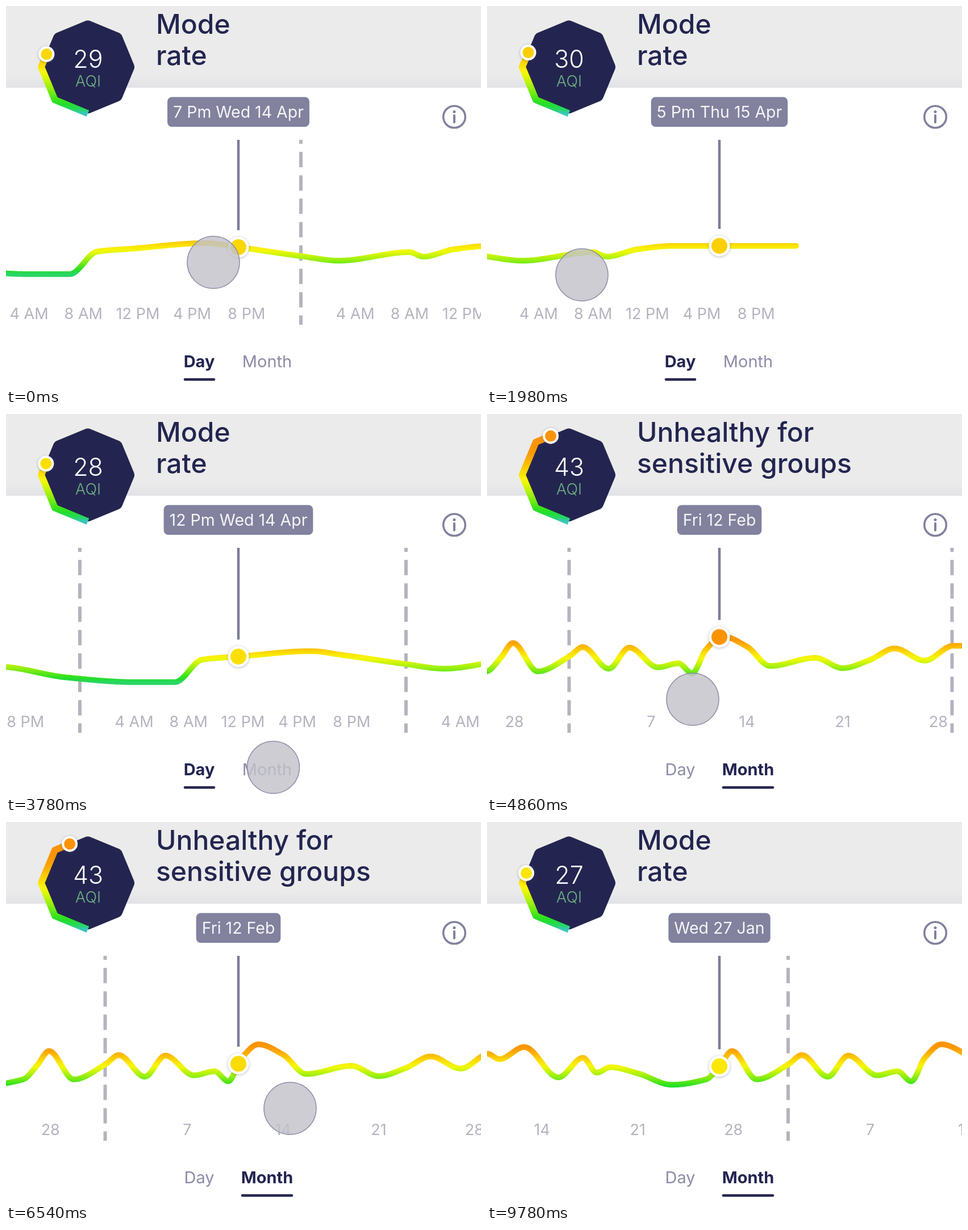
Write an HTML page with a canvas that moves like this. It is 836 by 670 pixels and loops after 9.84 s.

```html
<!DOCTYPE html>
<html lang="en">
<head>
<meta charset="utf-8">
<title>Air quality timeline</title>
<style>
html, body { margin: 0; width: 100%; height: 100%; overflow: hidden; background: #fff; }
canvas { display: block; }
</style>
</head>
<body>
<canvas id="stage" width="836" height="670"></canvas>
<script>
const ctx = document.getElementById('stage').getContext('2d');
const LOOP = 9840, STEP = 60, SWITCH = 4080;
const CURSOR_X = 409, HOUR = 23.92, DAY = 24.07;
const NAVY = '#232550', SLATE = '#82819e', PALE = '#b4b3bf';

// Monotone cubic through [x, y] points, flat at both ends.
function spline(points) {
  const last = points.length - 1;
  const slope = points.slice(1).map((p, i) => (p[1] - points[i][1]) / (p[0] - points[i][0]));
  const tangent = points.map((_, i) => {
    const a = slope[i - 1], b = slope[i];
    return i > 0 && i < last && a * b > 0 ? 2 * a * b / (a + b) : 0;
  });
  return x => {
    if (x <= points[0][0]) return points[0][1];
    if (x >= points[last][0]) return points[last][1];
    const i = points.findIndex(p => p[0] > x) - 1;
    const [x0, y0] = points[i], [x1, y1] = points[i + 1];
    const w = x1 - x0, u = (x - x0) / w, v = 1 - u;
    return v * v * (1 + 2 * u) * y0 + u * u * (3 - 2 * u) * y1
      + w * u * v * (v * tangent[i] - u * tangent[i + 1]);
  };
}

// Key readings: hours from the latest midnight, days from the first of February.
const dayAqi = spline([[-30, 20.5], [-25, 12.5], [-20, 9], [-17, 9], [-15, 25.7], [-12.3, 28], [-7, 32],
  [-4.6, 29], [0, 22.4], [2.8, 19], [8, 25.3], [9, 22], [11.3, 27.5], [14, 30]]);
const monthAqi = spline([[-22, 36], [-21.1, 32], [-19.3, 41], [-16.8, 18.5], [-15, 33], [-14, 22], [-13, 26],
  [-11, 21.5], [-8.5, 13], [-6, 17], [-5, 27], [-4.1, 38], [-2.3, 17], [0, 28], [1, 35], [2.9, 19], [4.4, 34.6],
  [6.5, 20], [8, 23], [9, 15.6], [10, 33], [11.2, 43], [13, 35.4], [14.7, 21], [18, 27], [20, 19.4],
  [22, 25.5], [23.8, 34], [26, 25], [28.1, 36]]);

const dayScroll = spline([[0, 519], [1980, -4.7], [3000, 704]]);
const monthScroll = spline([[6480, 144.5], [6540, 174.5], [6900, 380], [7700, 530]]);
const touch = [[0, 365, 452], [1980, 167, 474], [3000, 695, 509], [3900, 459, 628], [4150, 459, 628],
  [4860, 362, 503], [6300, 460, 505], [6540, 500, 505], [7100, 760, 505]];
const touchX = spline(touch.map(([t, x]) => [t, x]));
const touchY = spline(touch.map(([t, , y]) => [t, y]));

const ringPosition = spline([[5, 1.2], [27, 2.3], [30, 2.44], [43, 3.45]]);
const hue = spline([[7, 178], [9, 141], [25, 65], [30, 54], [43, 35]]);
const aqiColor = aqi => `hsl(${hue(aqi)}, ${Math.min(97, 115 - hue(aqi) / 3)}%, 50%)`;
const dotColor = aqi => aqiColor(aqi + 2.5);
const aqiY = aqi => 430 - (aqi - 27) * 2.375;

// Vertical paint whose colour follows the reading from `low` (at yLow) up to 43 (at yHigh).
function aqiPaint(low, yLow, yHigh) {
  const paint = ctx.createLinearGradient(0, yLow, 0, yHigh);
  for (let u = 0; u <= 1; u += 1 / 16) paint.addColorStop(u, aqiColor(low + (43 - low) * u));
  return paint;
}
const curvePaint = aqiPaint(9, aqiY(9), aqiY(43));
const ringPaint = aqiPaint(7, 190, 58);
const headerPaint = ctx.createLinearGradient(0, 122, 0, 144);
headerPaint.addColorStop(0, '#ebebeb');
headerPaint.addColorStop(1, '#e2e2e6');

function text(str, x, y, size, weight, color, align = 'center') {
  ctx.font = `${weight} ${size}px Inter, sans-serif`;
  ctx.textAlign = align;
  ctx.fillStyle = color;
  ctx.fillText(str, x, y);
}

function disc(x, y, r, color) {
  ctx.fillStyle = color;
  ctx.beginPath();
  ctx.arc(x, y, r, 0, 7);
  ctx.fill();
}

function stroke(points, width, color, cap = 'butt') {
  ctx.strokeStyle = color;
  ctx.lineWidth = width;
  ctx.lineCap = cap;
  ctx.lineJoin = 'round';
  ctx.beginPath();
  points.forEach(p => ctx.lineTo(...p));
  ctx.stroke();
}

function knob(x, y, r, rim, color) {
  ctx.save();
  ctx.shadowColor = 'rgba(60,60,90,.35)';
  ctx.shadowBlur = 5;
  ctx.shadowOffsetY = 1;
  disc(x, y, r + rim, '#fff');
  ctx.restore();
  disc(x, y, r, color);
}

function divider(x) {
  ctx.setLineDash([27, 14.2]);
  ctx.lineDashOffset = 20;
  stroke([[x, 236], [x, 562]], 6, PALE);
  ctx.setLineDash([]);
}

// Octagon corner, clockwise from the bottom.
function corner(k, r) {
  const a = Math.PI / 2 + k * Math.PI / 4;
  return [144 + r * Math.cos(a), 107.5 + r * Math.sin(a)];
}

function ringPoint(s) {
  const k = Math.floor(s), [x0, y0] = corner(k, 82), [x1, y1] = corner(k + 1, 82);
  return [x0 + (x1 - x0) * (s - k), y0 + (y1 - y0) * (s - k)];
}

function drawHeader(aqi) {
  ctx.fillStyle = headerPaint;
  ctx.fillRect(0, 0, 836, 144);
  const title = aqi < 20 ? ['Good'] : aqi < 40 ? ['Mode', 'rate'] : ['Unhealthy for', 'sensitive groups'];
  title.forEach((line, i) => text(line, 264, 49 + 55 * i, 48, 500, NAVY, 'left'));

  const octagon = Array.from({ length: 9 }, (_, k) => corner(k, 70));
  stroke(octagon, 24, NAVY, 'round');
  ctx.fillStyle = NAVY;
  ctx.fill();

  const end = ringPosition(aqi), path = [];
  for (let k = 0; k < end; k++) path.push(ringPoint(k));
  path.push(ringPoint(end));
  stroke(path, 12, ringPaint);
  knob(...ringPoint(end), 10, 4, dotColor(aqi));
  text(aqi, 144.5, 109, 43, 300, '#fff');
  text('AQI', 144.5, 142, 27, 300, '#70b283');
}

function drawAxis(monthly, origin) {
  if (monthly) {
    for (let n = -31; n < 31; n++) {
      const date = new Date(Date.UTC(2021, 1, 1 + n)).getUTCDate(), x = origin + n * DAY;
      if (date === 1) divider(x);
      else if (date % 7 === 0) text(date, x, 552, 27, 400, PALE);
    }
  } else {
    for (let h = -32; h < 24; h += 4) {
      const clock = (h + 48) % 24, x = origin + h * HOUR;
      if (!clock) divider(x);
      else text(`${clock % 12 || 12} ${clock < 12 ? 'AM' : 'PM'}`, x, 552, 27, 400, PALE);
    }
  }
}

function drawBadge(label) {
  ctx.font = '400 28.5px Inter, sans-serif';
  const w = ctx.measureText(label).width + 20;
  ctx.fillStyle = SLATE;
  ctx.beginPath();
  ctx.roundRect(CURSOR_X - w / 2, 160.5, w, 52.5, 8);
  ctx.fill();
  text(label, CURSOR_X, 197, 28.5, 400, '#f5f5f9');
}

function drawInfo() {
  ctx.strokeStyle = SLATE;
  ctx.lineWidth = 3.6;
  ctx.beginPath();
  ctx.arc(789, 195.5, 19.3, 0, 7);
  ctx.stroke();
  disc(789, 186.5, 2.5, SLATE);
  stroke([[789, 193], [789, 205]], 4, SLATE, 'round');
}

function drawTabs(monthly) {
  const tab = (name, x, active) => text(name, x, 637, 29, active ? 700 : 400, active ? NAVY : '#8c8ba6');
  tab('Day', 340, !monthly);
  tab('Month', 459.5, monthly);
  const [from, to] = monthly ? [416, 503] : [315, 366];
  stroke([[from, 658.5], [to, 658.5]], 4.5, NAVY, 'round');
}

function labelFor(monthly, n) {
  const date = new Date(monthly ? Date.UTC(2021, 1, 1 + n) : Date.UTC(2021, 3, 15, n));
  const s = date.toUTCString(), h = date.getUTCHours();
  const day = `${s.slice(0, 3)} ${+s.slice(5, 7)} ${s.slice(8, 11)}`;
  return monthly ? day : `${h % 12 || 12} ${h < 12 ? 'Am' : 'Pm'} ${day}`;
}

function drawTouch(t) {
  ctx.globalAlpha = Math.min(1, Math.max(0, (7200 - t) / 200));
  disc(touchX(t), touchY(t), 46, 'rgba(195,194,202,.82)');
  ctx.strokeStyle = '#8d8ba8';
  ctx.lineWidth = 1.5;
  ctx.stroke();
  ctx.globalAlpha = 1;
}

function draw(t) {
  const monthly = t >= SWITCH;
  const [scroll, reading, unit] = monthly ? [monthScroll, monthAqi, DAY] : [dayScroll, dayAqi, HOUR];
  const origin = scroll(t), aqiAt = x => reading((x - origin) / unit);
  // Badge and gauge trail the curve by one step.
  const shown = (CURSOR_X - scroll(t - STEP)) / unit;

  ctx.fillStyle = '#fff';
  ctx.fillRect(0, 0, 836, 670);
  drawHeader(Math.round(reading(shown)));
  drawInfo();
  drawAxis(monthly, origin);

  const line = [], end = monthly ? 846 : Math.min(846, origin + 23 * HOUR);
  for (let x = -10; x < end; x += 2) line.push([x, aqiY(aqiAt(x))]);
  stroke(line, 10, curvePaint, 'round');

  drawBadge(labelFor(monthly, Math.round(shown)));
  const aqi = aqiAt(CURSOR_X), y = aqiY(aqi);
  stroke([[CURSOR_X, 236], [CURSOR_X, y - 30]], 4.5, '#7d7c9a');
  knob(CURSOR_X, y, 14, 4.5, dotColor(aqi));
  drawTabs(monthly);
  drawTouch(t);
}

function tick() {
  const t = performance.now() % LOOP;
  draw(t - t % STEP);
  requestAnimationFrame(tick);
}
tick();
</script>
</body>
</html>
```
